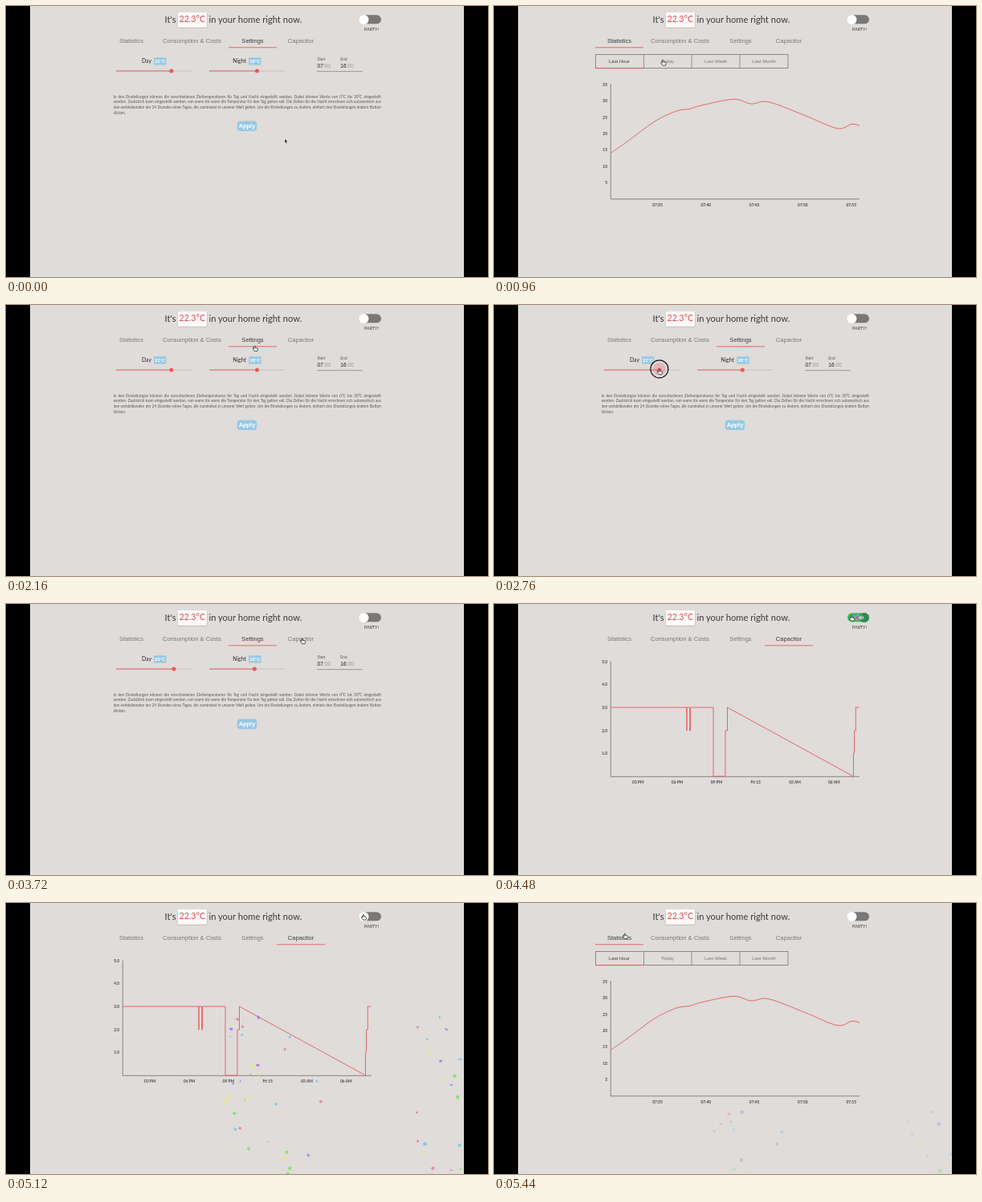
Animation, 600 px wide and 338 px high, one loop 5.48 s. Source, as an HTML page:

```html
<!DOCTYPE html>
<html lang="en">
<head>
<meta charset="utf-8">
<title>Home temperature</title>
<style>
html, body { margin: 0; width: 100%; height: 100%; overflow: hidden; background: #000; }
svg { display: block; width: 100vw; height: 100vh; }
.lato { font-family: Lato, sans-serif; }
.sans { font-family: "Liberation Sans", Arial, sans-serif; }
.note { font: 4.75px/6.7px Lato, sans-serif; color: #5c5b5a; }
.note div { white-space: nowrap; text-align: justify; text-align-last: justify; }
.note div:last-child { text-align-last: left; }
</style>
</head>
<body>
<svg id="stage" viewBox="0 0 600 338"></svg>
<script>
const LOOP = 5480, STEP = 40;
const RED = '#e9585b', BLUE = '#98c8e2', GREY = '#7a7877', DARK = '#3c3b3b';
const stage = document.getElementById('stage');

function el(tag, attrs, parent = stage) {
  const node = document.createElementNS('http://www.w3.org/2000/svg', tag);
  for (const k in attrs) node.setAttribute(k, attrs[k]);
  return parent.appendChild(node);
}
const group = parent => el('g', {}, parent);
const rect = (x, y, width, height, fill, parent, rx = 0) =>
  el('rect', { x, y, width, height, fill, rx }, parent);
const path = (d, stroke, parent, w = 0.9) =>
  el('path', { d, stroke, fill: 'none', 'stroke-width': w, 'stroke-linejoin': 'round' }, parent);
const dot = (cx, cy, r, fill, parent) => el('circle', { cx, cy, r, fill }, parent);
// y is the middle of the capitals
function text(str, x, y, size, fill, parent, font = 'lato', anchor = 'middle', weight = 400) {
  const node = el('text', { x, y: y + size * 0.36, 'font-size': size, fill, class: font,
    'text-anchor': anchor, 'font-weight': weight }, parent);
  node.textContent = str;
  return node;
}
const show = (node, on) => node.setAttribute('display', on ? 'inline' : 'none');
const move = (node, x, y) => node.setAttribute('transform', `translate(${x} ${y})`);

let seed = 11;
const rnd = () => (seed = (seed * 16807) % 2147483647) / 2147483647;
const between = (a, b) => a + rnd() * (b - a);

// Header
rect(30, 0, 540, 338, '#dfdcda');
text("It's", 197.5, 16.5, 11.2, DARK, stage, 'lato', 'start');
rect(213.6, 8.4, 37, 19.4, 'rgba(0,0,0,.13)', stage, 1.5);
rect(214, 8, 36, 18.8, '#fbfaf9', stage, 1);
text('22.3°C', 231.8, 16.5, 10.7, '#d94b50');
text('in your home right now.', 252.5, 16.5, 11.15, DARK, stage, 'lato', 'start');
const track = rect(440, 11.3, 27, 11, GREY, stage, 5.5);
const knob = dot(0, 17, 6, '#fff');
text('PARTY!', 455, 28.7, 5.4, DARK);

const tabs = [['Statistics', 156], ['Consumption & Costs', 231.5], ['Settings', 307], ['Capacitor', 367]]
  .map(([name, x]) => ({ x, label: text(name, x, 43.6, 7.55, GREY, stage, 'sans') }));
const tabLine = path('M0 51.8h60', RED);

// Charts
const axes = (parent, top, bottom) =>
  path(`M145.3 ${top}V${bottom}H455`, '#6a6766', parent, 0.75);
const label = (str, x, y, parent, anchor) =>
  text(str, x, y, 4.9, '#333', parent, 'lato', anchor, 600);
const ticks = (names, x, gap, y, parent) =>
  names.forEach((name, i) => label(name, x + i * gap, y, parent));
const poly = pts => 'M' + pts.map(p => p.join(' ')).join('L');

function smooth(p) {
  let d = `M${p[0]}`;
  for (let i = 0; i < p.length - 1; i++) {
    const a = p[i - 1] || p[i], b = p[i], c = p[i + 1], e = p[i + 2] || c;
    d += `C${b[0] + (c[0] - a[0]) / 6} ${b[1] + (c[1] - a[1]) / 6} ` +
      `${c[0] - (e[0] - b[0]) / 6} ${c[1] - (e[1] - b[1]) / 6} ${c}`;
  }
  return d;
}
// Zigzag of n readings between two heights
const burst = (x0, x1, top, bottom, n) => Array.from({ length: n }, (_, i) => {
  const mid = (top + bottom) / 2;
  return [x0 + (x1 - x0) * i / n, i % 2 ? between(mid, bottom) : between(top, mid)];
});

const hour = [[145, 183.5], [166, 169], [200, 144], [227, 131], [243, 128.5], [258, 124],
  [298, 116.3], [320, 122], [342, 119.7], [387, 136.5], [427, 152.6], [445, 147.4], [455, 149.3]];
const week = [[151, 241], [151, 98], [152.7, 98], [152.7, 241], [153.8, 117], [260, 165],
  ...burst(261, 265, 135, 162, 6), [265, 160.5], [361, 165.5], [363, 128], [377.5, 151],
  ...burst(378, 382, 114, 122, 5), ...burst(382, 399, 134, 154, 26),
  ...burst(399, 405, 138, 166, 6), [405, 162], [452, 184], [453.5, 117], [454.3, 152]];
// The last 24 hours, widened to the whole axis
const today = [[145, 164.7], ...week.filter(p => p[0] > 336)
  .map(([x, y]) => [145 + (x - 336) * 2.605, y])];

const pages = { stats: group(), settings: group(), cap: group() };
const { stats, settings, cap } = pages;

const rangeX = i => 156 + 60 * i;
rect(126.5, 60.5, 239.5, 17, 'none', stats).setAttribute('stroke', '#8b8887');
path('M186.5 60V78M246 60V78M306 60V78', '#8b8887', stats);
const ranges = ['Last Hour', 'Today', 'Last Week', 'Last Month']
  .map((name, i) => text(name, rangeX(i), 69, 6, GREY, stats, 'sans'));
const rangeLine = path('M0 77.6h60', RED, stats);
for (let v = 5; v <= 35; v += 5) label(v, 141, 241 - v * 4.086, stats, 'end');
axes(stats, 97, 240.8);

const days = ['Wed 13', '12 PM', 'Thu 14', '12 PM', 'Fri 15'];
const plots = [
  [smooth(hour), ['07:35', '07:40', '07:45', '07:50', '07:55'], 203.5, 60.3],
  [poly(today), ['12 PM', '03 PM', '06 PM', '09 PM', 'Fri 15', '03 AM', '06 AM'], 197, 38.8],
  [poly(week), days, 178, 59.3],
  [poly(week), days, 178, 59.3]
].map(([d, names, x, gap]) => {
  const g = group(stats);
  path(d, RED, g);
  ticks(names, x, gap, 248, g);
  return g;
});

axes(cap, 71.5, 215.3);
for (let v = 1; v <= 5; v++) label(v + '.0', 141, 215.3 - v * 28.7, cap, 'end');
ticks(['03 PM', '06 PM', '09 PM', 'Fri 15', '03 AM', '06 AM'], 179.3, 48.8, 222.7, cap);
path('M145 129H240V158V129H243.6V158H244.6V129H273V215H288V186V158H290.5V129' +
  'L447.5 215V186H448.5V158H450.3V129H454.5', RED, cap);

// Settings
function slider(name, nameX, chipX, x0) {
  text(name, nameX, 68.8, 6.9, DARK, settings, 'lato', 'end', 500);
  rect(chipX, 64.3, 15.4, 9.2, BLUE, settings, 0.5);
  const value = text('', chipX + 7.7, 69, 6, '#fff', settings, 'sans', 'middle', 700);
  path(`M${x0} 81H${x0 + 94}`, '#c3bfbd', settings);
  const fill = path('', RED, settings);
  const thumb = dot(0, 81, 2.5, RED, settings);
  const at = deg => x0 + deg * 3.13;
  const set = deg => {
    value.textContent = Math.round(deg) + '°C';
    fill.setAttribute('d', `M${x0} 81H${at(deg)}`);
    thumb.setAttribute('cx', at(deg));
  };
  return { at, set };
}
const day = slider('Day', 181, 184, 137);
const night = slider('Night', 299, 302.2, 253);

[['Start', '07', 387.5], ['End', '16', 416.3]].forEach(([name, h, x]) => {
  text(name, x, 66.6, 4.6, '#555', settings, 'sans', 'start');
  text(h, x, 75, 6.6, '#222', settings, 'sans', 'start');
  text(':00', x + 7.4, 75, 6.6, '#999', settings, 'sans', 'start');
});
path('M387 81.6H444', '#8b8887', settings, 0.8);

const note = document.createElement('div');
note.className = 'note';
[
  'In den Einstellungen können die verschiedenen Zieltemperaturen für Tag und Nacht eingestellt werden. Dabei können Werte von 0°C bis 30°C eingestellt',
  'werden. Zusätzlich kann eingestellt werden, von wann bis wann die Temperatur für den Tag gelten soll. Die Zeiten für die Nacht errechnen sich automatisch aus',
  'den verbleibenden der 24 Stunden eines Tages, die zumindest in unserer Welt gelten. Um die Einstellungen zu ändern, einfach den Einstellungen ändern Button',
  'klicken.'
].forEach(line => note.appendChild(document.createElement('div')).textContent = line);
el('foreignObject', { x: 133.5, y: 109.6, width: 333.5, height: 32 }, settings).append(note);

rect(287.7, 143.5, 24.6, 12.6, BLUE, settings, 4);
text('Apply', 300, 149.8, 7.4, '#fff', settings, 'sans', 'middle', 700);

const ring = group();
dot(0, 0, 8, 'rgba(226,90,92,.28)', ring);
const outline = dot(0, 0, 11, 'none', ring);
outline.setAttribute('stroke', '#161616');
outline.setAttribute('stroke-width', 1.2);

// Confetti: two clouds thrown to either side of the switch
const PARTY = 4480;
const hues = ['#9a5cf2', '#46c4ee', '#67e04e', '#ef6486', '#f0ea62'];
const bits = Array.from({ length: 76 }, (_, i) => {
  const size = between(2.6, 4.2);
  return {
    dx: between(55, 185) * (i % 2 ? 1 : -1), dy: between(-115, 105),
    spin: rnd() * 360, flip: rnd() * 6, turn: rnd() - 0.5,
    node: rect(-size / 2, -size / 2, size, size, hues[i % 5])
  };
});
rect(570, 0, 30, 338, '#000');

function drawConfetti(age) {
  for (const b of bits) {
    show(b.node, age >= 0);
    if (age < 0) continue;
    const out = 1 - Math.exp(-age / 100);
    const x = 455 + b.dx * out + 3 * Math.cos(b.flip + age / 150);
    const y = 17 + b.dy * out + age * 0.37;
    const flat = 0.25 + 0.75 * Math.abs(Math.cos(b.flip + age / 130));
    b.node.setAttribute('transform',
      `translate(${x} ${y}) rotate(${b.spin + b.turn * age}) scale(1 ${flat})`);
    b.node.setAttribute('opacity', Math.max(0, 1 - (age / 1150) ** 2));
  }
}

// Pointer
const arrow = el('path', { d: 'M0 0V5.6L1.3 4.5L2.2 6.5L3.1 6.1L2.2 4.1H3.9Z',
  fill: '#111', stroke: '#fff', 'stroke-width': 0.5 });
const hand = el('path', { d: 'M-.8 .4Q0-.5 .7 .4V2.4L3.3 3Q3.9 3.3 3.7 4.3L3 6.6H-.4L-2.4 3.9Q-2-.0-.8 3.6Z',
  fill: '#fff', stroke: '#222', 'stroke-width': 0.75, 'stroke-linejoin': 'round' });

const onTab = (i, dx = 2) => [tabs[i].x + dx, 45 - dx];
const onRange = (i, dx) => [rangeX(i) + dx, 67.5];
const grab = (s, deg) => [s.at(deg), 80];
const toggle = [445, 14.5];

// Each stop: arrival, place, then the click and what it changes
const TRAVEL = 200;
const stops = [
  [0, [347, 165.5], 0, { page: 'settings', tab: 2, range: 0, on: false }],
  [300, onTab(0, 5), 360, { page: 'stats', tab: 0 }],
  [880, onRange(1, -5.5), 1000, { range: 1 }],
  [1200, onRange(2, -5), 1240, { range: 2 }],
  [1440, onRange(3, -6), 1560, { range: 3 }],
  [1920, onTab(2), 2040, { page: 'settings', tab: 2 }],
  [2300, grab(night, 19), 2300, { held: night }],
  [2520, grab(night, 18), 2520, { held: null }],
  [2720, grab(day, 22), 2720, { held: day }],
  [2960, grab(day, 23), 2960, { held: null }],
  [3240, [300, 149], 3280, {}],
  [3580, onTab(3), 3760, { page: 'cap', tab: 3 }],
  [4400, toggle, PARTY, { on: true }],
  [4800, toggle, 4960, { on: false }],
  [5320, onTab(0, 7), 5400, { page: 'stats', tab: 0, range: 0 }]
];

// Eased progress of the travel that ends at the given time
function travel(t, arrival) {
  const u = Math.min(1, Math.max(0, (t - arrival) / TRAVEL + 1));
  return u * u * (3 - 2 * u);
}
function pointerAt(t) {
  let [x, y] = stops[0][1];
  for (const [arrival, to] of stops) {
    const u = travel(t, arrival);
    x += (to[0] - x) * u;
    y += (to[1] - y) * u;
  }
  return [x, y];
}
const links = [[126, 36, 397, 53], [126, 60, 366, 86], [288, 143, 312, 156], [440, 10, 467, 24]];

function draw(t) {
  const s = {};
  for (const [, , click, change] of stops) if (click <= t) Object.assign(s, change);

  for (const name in pages) show(pages[name], name === s.page);
  tabs.forEach((tab, i) => tab.label.setAttribute('fill', i === s.tab ? DARK : GREY));
  move(tabLine, tabs[s.tab].x - 30, 0);
  ranges.forEach((r, i) => r.setAttribute('fill', i === s.range ? DARK : GREY));
  move(rangeLine, rangeX(s.range) - 30, 0);
  plots.forEach((p, i) => show(p, i === s.range));

  const nightDeg = 19 - travel(t, 2520), dayDeg = 22 + travel(t, 2960);
  night.set(nightDeg);
  day.set(dayDeg);
  show(ring, s.held);
  move(ring, s.held === night ? night.at(nightDeg) : day.at(dayDeg), 79.8);

  track.setAttribute('fill', s.on ? '#43b566' : GREY);
  knob.setAttribute('fill', s.on ? '#318c4b' : '#fff');
  knob.setAttribute('cx', s.on ? 461 : 445.5);
  drawConfetti(t - PARTY);

  const [x, y] = pointerAt(t);
  const over = links.some(([l, a, r, b]) => x >= l && x <= r && y >= a && y <= b);
  show(hand, over);
  show(arrow, !over);
  move(over ? hand : arrow, x, y);
}

const start = performance.now();
function tick() {
  const t = (performance.now() - start) % LOOP;
  draw(Math.floor(t / STEP) * STEP);
  requestAnimationFrame(tick);
}
tick();
</script>
</body>
</html>
```
